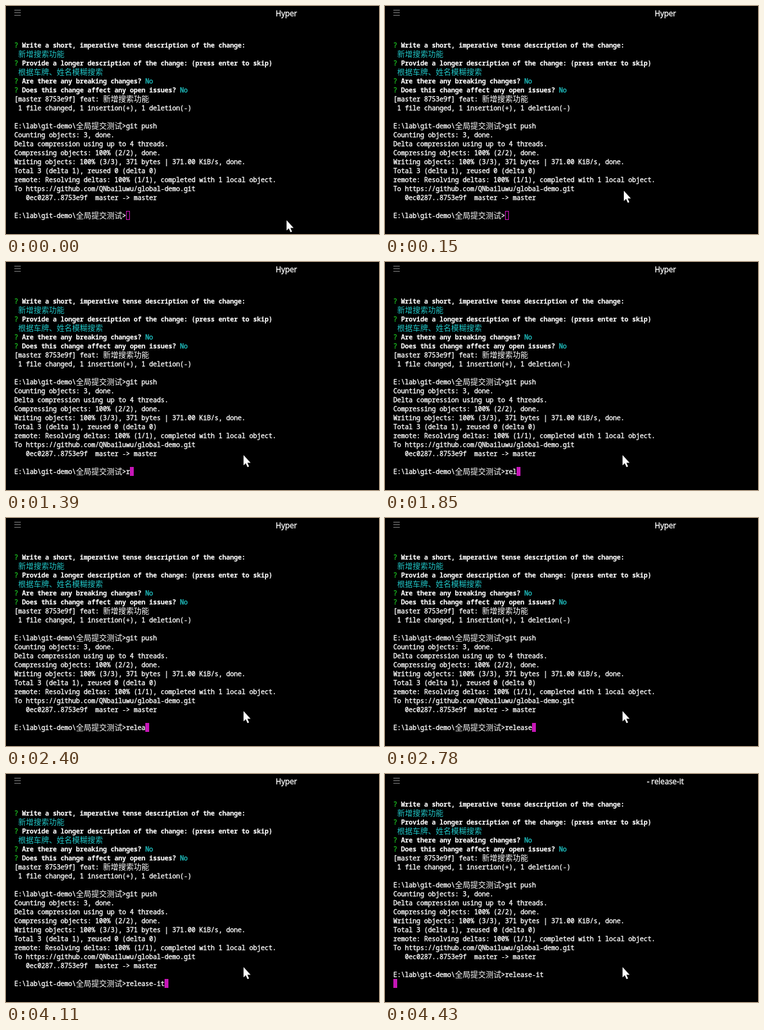
An HTML page for the animation above (8 s loop, 581 by 356 pixels).

```html
<!DOCTYPE html>
<html lang="zh-CN">
<head>
<meta charset="utf-8">
<title>Terminal</title>
<style>
html, body { margin: 0; width: 100%; height: 100%; overflow: hidden; background: #000; }
svg { display: block; width: 581px; height: 356px; }
text { white-space: pre; fill: #fff; stroke: #fff; stroke-width: .35px; }
.term { font: 400 10px "Noto Sans Mono", "DejaVu Sans Mono", monospace; font-variant-ligatures: none; }
.bold { font-weight: 700; stroke-width: .15px; }
.green { fill: #1dc121; stroke: #1dc121; }
.cyan { fill: #20c5c6; stroke: #20c5c6; }
.cjk { font: 400 12px "Noto Sans CJK SC", "Noto Sans CJK", sans-serif; stroke: none; }
.title { font: 400 11.8px "Open Sans", "Noto Sans", sans-serif; text-anchor: middle; }
</style>
</head>
<body>
<svg viewBox="0 0 581 356">
  <rect width="581" height="356"/>
  <path d="M13 6.5h10M13 10.5h10M13 14.5h10" stroke="#808080"/>
  <text class="title" id="title" x="436.7" y="16"></text>
  <g class="term" id="screen"></g>
  <rect id="caret" stroke="#f81ce5"/>
  <path id="mouse" fill="#fff" stroke="#000" paint-order="stroke"
    d="M0 -.5V15.5L3.5 12.3L6.2 18.3L8.6 17.3L6 11.4H11Z"/>
</svg>
<script>
const LOOP = 8000, LEFT = 13, TOP = 54, COL = 6, ROW = 14;
const $ = id => document.getElementById(id);
const screen = $('screen'), title = $('title'), caret = $('caret'), mouse = $('mouse');

const PROMPT = 'E:\\lab\\git-demo\\全局提交测试>';
const ask = (question, reply = '') => [['green', '? '], ['bold', question], ['cyan', reply]];
const plain = text => [['', text]];

const rows = [
  ask('Write a short, imperative tense description of the change:'),
  [['cyan', ' 新增搜索功能']],
  ask('Provide a longer description of the change: (press enter to skip)'),
  [['cyan', ' 根据车牌、姓名模糊搜索']],
  ask('Are there any breaking changes? ', 'No'),
  ask('Does this change affect any open issues? ', 'No'),
  ...[
    '[master 8753e9f] feat: 新增搜索功能',
    ' 1 file changed, 1 insertion(+), 1 deletion(-)',
    '',
    PROMPT + 'git push',
    'Counting objects: 3, done.',
    'Delta compression using up to 4 threads.',
    'Compressing objects: 100% (2/2), done.',
    'Writing objects: 100% (3/3), 371 bytes | 371.00 KiB/s, done.',
    'Total 3 (delta 1), reused 0 (delta 0)',
    'remote: Resolving deltas: 100% (1/1), completed with 1 local object.',
    'To https://github.com/QNbailuwu/global-demo.git',
    '   0ec0287..8753e9f  master -> master',
    '',
    PROMPT
  ].map(plain)
];

function addText(x, y, cls, text) {
  const el = document.createElementNS('http://www.w3.org/2000/svg', 'text');
  el.setAttribute('x', x);
  el.setAttribute('y', y);
  el.setAttribute('class', cls);
  el.textContent = text;
  screen.append(el);
  return el;
}

// Wide characters take two columns; returns the x after the row.
function addRow(parts, n) {
  let x = LEFT;
  for (const [cls, text] of parts) {
    for (const run of text.match(/[\u3000-\u9fff]+|[^\u3000-\u9fff]+/g) || []) {
      const wide = run.charCodeAt(0) >= 0x3000;
      addText(x, TOP + n * ROW + (wide ? 12 : 11), wide ? cls + ' cjk' : cls, run);
      x += run.length * COL * (wide ? 2 : 1);
    }
  }
  return x;
}

let inputX = LEFT;
rows.forEach((parts, n) => { inputX = addRow(parts, n); });
const lastTop = TOP + (rows.length - 1) * ROW;
const input = addText(inputX, lastTop + 11, '', '');

const COMMAND = 'release-it';
const keyTimes = [1390, 1540, 1850, 2000, 2400, 2630, 2780, 3730, 4030, 4110];
const FOCUS = 230, ENTER = 4430;
const mouseSteps = [[0, 437, 335], [70, 397, 303], [150, 372, 289], [230, 370, 302]];

function draw(t) {
  const typed = keyTimes.filter(k => k <= t).length;
  const sent = t >= ENTER;
  input.textContent = COMMAND.slice(0, typed);
  title.textContent = sent ? '- release-it' : 'Hyper';
  screen.setAttribute('transform', `translate(0 ${sent ? -ROW : 0})`);

  const focused = t >= FOCUS, inset = focused ? 0 : 0.5;
  caret.setAttribute('x', (sent ? LEFT : inputX + typed * COL) + inset);
  caret.setAttribute('y', lastTop + inset);
  caret.setAttribute('width', COL - 2 * inset);
  caret.setAttribute('height', ROW - 2 * inset);
  caret.setAttribute('fill', focused ? '#c616b7' : 'none');
  caret.setAttribute('stroke-width', focused ? 0 : 1);
  caret.setAttribute('opacity', focused ? 1 : 0.8);

  const [, x, y] = mouseSteps.filter(s => s[0] <= t).pop();
  mouse.setAttribute('transform', `translate(${x} ${y})`);
}

const start = performance.now();
function tick() {
  draw((performance.now() - start) % LOOP);
  requestAnimationFrame(tick);
}
draw(0);
requestAnimationFrame(tick);
</script>
</body>
</html>
```
